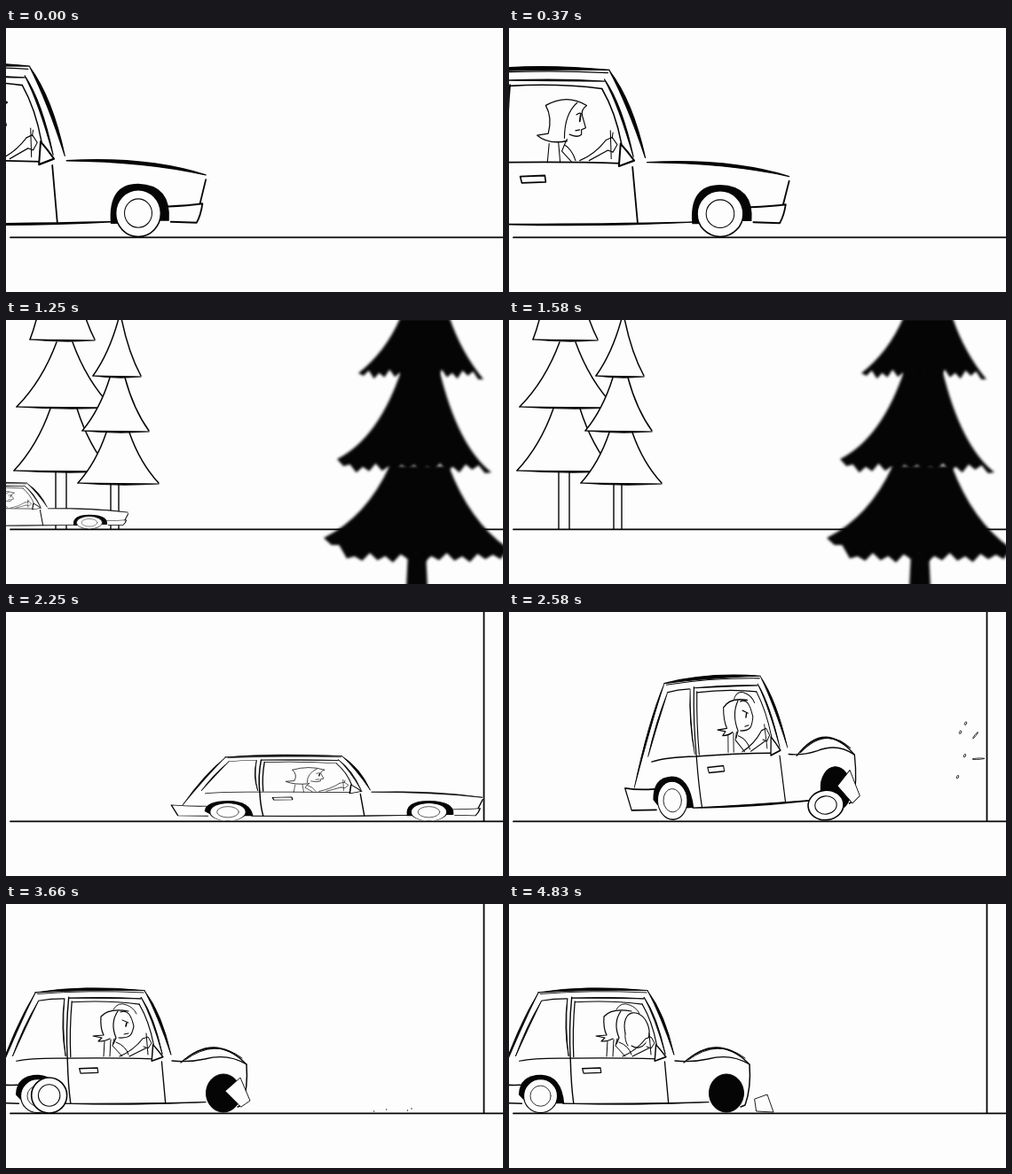
An HTML page with a canvas for the animation above (5000 ms loop, 560 px wide and 298 px high).

```html
<!DOCTYPE html>
<html lang="en">
<head>
<meta charset="utf-8">
<title>Car crash</title>
<style>
html, body { margin: 0; overflow: hidden; background: #fdfdfd; }
canvas { display: block; }
</style>
</head>
<body>
<canvas id="stage" width="560" height="298"></canvas>
<script>
const c = document.getElementById('stage').getContext('2d');
const PAPER = '#fdfdfd', INK = '#050505', GROUND = 236, LOOP = 5000, FPS = 24;
const clamp = v => Math.max(0, Math.min(1, v));

function line(d, w = 1.4) {
  c.lineWidth = w;
  c.stroke(new Path2D(d));
}
function fill(d, color = PAPER) {
  c.fillStyle = color;
  c.fill(new Path2D(d));
}
// Curved stroke that swells to about w in the middle
function brush(x0, y0, cx, cy, x1, y1, w) {
  const len = Math.hypot(x1 - x0, y1 - y0);
  const nx = (y0 - y1) / len * w, ny = (x1 - x0) / len * w;
  const d = `M${x0} ${y0}Q${cx + nx} ${cy + ny} ${x1} ${y1}Q${cx - nx} ${cy - ny} ${x0} ${y0}Z`;
  fill(d, INK);
  line(d, 1.2);
}
function oval(x, y, rx, ry, w, rot = 0, color = PAPER) {
  c.beginPath();
  c.ellipse(x, y, rx, ry, rot, 0, 7);
  c.fillStyle = color;
  c.fill();
  c.lineWidth = w;
  c.stroke();
}
function wheel(x, y, rx, ry, rot = 0) {
  oval(x, y, rx, ry, 1.6, rot);
  oval(x, y, rx * .61, ry * .61, 1.1, rot);
}
// Scale about the ground point under ax, placed at x
function place(ax, x, sx, sy, draw) {
  c.save();
  c.translate(x, GROUND);
  c.scale(sx, sy);
  c.translate(-ax, -GROUND);
  draw();
  c.restore();
}

function cabin() {
  // roof and pillars
  brush(114, 60, 190, 52, 290, 57, 3.6);
  line('M118 62Q200 56 288 60', 1.2);
  brush(114, 61, 84, 110, 50, 192, 2.8);
  brush(119, 73, 96, 112, 78, 153, 2);
  line('M119 72Q138 69 160 69');
  brush(161, 69, 156, 112, 163, 153, 1.2);
  line('M168 67Q163 112 166 160Q167 195 171 222', 2);
  line('M173 73Q169 115 171 154', 1.8);
  brush(169, 68, 230, 67, 284, 69, 1.2);
  line('M173 74Q230 71 281 77', 1.5);
  brush(290, 58, 314, 92, 332, 151, 3.6);
  brush(284, 67, 303, 95, 318, 150, 2);
  line('M281 77Q297 102 304 136', 1.6);
  // belt, door, handle, sill
  line('M84 160Q110 155 165 156Q240 155 304 157', 1.6);
  line('M317 161Q320 190 323 221', 1.9);
  line('M185 171L214 170L215 177L187 178Z', 1.7);
  brush(154, 222, 260, 224, 388, 220, 1.6);
  fill('M303 136Q311 144 319 154L301 160Z');
  line('M303 136Q311 144 319 154L301 160Z', 2.1);
  // rear bumper and wheel
  line('M33 192Q60 196 86 195M33 192L43 221L88 222', 2);
  fill('M83 209Q84 180 119 180Q152 181 156 222L140 222L90 216Z', INK);
  wheel(118, 211, 27, 24.6);
}

function driver() {
  line('M215 95Q240 82 263 95M215 95Q223 108 218 125L205 127Q218 137 240 133', 1.3);
  line('M252 92Q237 104 237 130M263 95Q256 100 258 106L262 119L257 121L257 126Q252 130 243 126', 1.2);
  line('M251 105Q255 102 257 104', 1);
  line('M256 105L255 112', 1.8);
  line('M250 122L255 121M219 136L217 156M230 135L232 156M240 131L237 137Q246 142 250 154M237 137L234 144L245 155', 1.1);
  line('M255 154Q272 148 286 132M266 154L290 142', 1.2);
  fill('M286 132L293 129L299 137L294 145L288 143Z');
  line('M286 132L293 129L299 137L294 145L288 143M291 122L292 152M294 124L293 130', 1.1);
}

function car() {
  fill('M33 192L50 192L114 58Q200 50 290 57L333 155Q430 155 502 171L494 200L490 221L42 222Z');
  driver();
  cabin();
  brush(334, 156, 430, 154, 501, 171, 2.8);
  line('M501 176L494 201', 1.9);
  line('M456 204Q480 203 497 201Q495 213 490 221L459 220', 1.9);
  fill('M387 222Q383 180 420 180Q460 181 457 219L444 219L393 222Z', INK);
  wheel(420, 211, 27, 24.6);
}

function shakenDriver(slump) {
  line('M107 127Q116 117 138 121M107 127Q106 140 110 148L98 149L108 151L104 155Q112 155 117 152', 1.2);
  line('M121 119Q126 110 136 114Q144 117 147 124', .9);
  line('M111 155L110 172M118 153L117 172M122 152L120 160L131 172M124 156Q135 160 138 170', 1);
  const up = [129, 122, 137, 119, 141, 125, 144, 138, 142, 146, 142, 152, 127, 151];
  const down = [131, 146, 125, 117, 150, 116, 157, 138, 162, 152, 150, 168, 138, 160];
  const p = up.map((v, i) => v + (down[i] - v) * slump);
  const head = `M${p[0]} ${p[1]}C${p.slice(2, 8)}C${p.slice(8)}`;
  fill(head);
  line(head, 1.1);
  line('M126 121Q117 134 124 151L121 158', 1.2);
  if (slump < .4) {
    c.save();
    c.translate(slump * 14, slump * 12);
    line('M131 131L138 134M133 147L138 146', 1);
    line('M136 134L135 138', 1.6);
    c.restore();
  } else {
    line('M131 146Q130 154 134 160', 1);
  }
  line('M128 172Q144 165 154 152M139 172L161 161', 1.1);
  fill('M154 152L160 150L164 157L160 163L155 161Z');
  line('M154 152L160 150L164 157L160 163L155 161M158 146L160 170', 1);
}

function wreck(n) {
  const slump = clamp((n - 105) / 11);
  shakenDriver(slump * slump * (3 - 2 * slump));
  place(167, 70, .703, .773, cabin);
  line('M187 177Q206 179 224 175Q250 168 271 181', 1.3);
  brush(197, 179, 235, 145, 270, 180, .8);
  line('M202 176Q236 151 266 174', 1);
  line('M271 181Q273 208 266 227L261 229', 1.5);
  oval(245, 213.5, 19.5, 21.5, 1, 0, INK);
  // fender piece drops off
  const q = clamp((n - 105) / 7);
  const on = [247, 211, 264, 196, 275, 222, 265, 229], off = [277, 220, 291, 215, 298, 235, 279, 234];
  const p = on.map((v, i) => v + (off[i] - v) * (i % 2 ? q * q : q));
  const piece = `M${p}Z`;
  fill(piece);
  line(piece, .9);
}

function crash(n) {
  const d = n - 55, p = clamp(d / 21.6), rest = 1 - p;
  const dx = 267 * rest * rest;
  const tall = 1 + .643 * rest ** 4;
  c.save();
  c.translate(37 + dx, GROUND);
  c.rotate(-.063 * Math.sin(Math.PI * p));
  c.translate(-37, -GROUND);
  place(271, 271, 1 / tall, tall, () => wreck(n));
  c.restore();

  // loose wheel rolls away
  if (n < 96) {
    const u = n - 69;
    const x = u < 0 ? 245 + dx - 20 * d / 14 : 258 - 12.5 * u + .078 * u * u;
    const tilt = u < 0 ? d / 14 : clamp(1 - u / 12);
    wheel(x, 216 + 4 * tilt, 20, 20 - 6.5 * tilt, -.22 * tilt);
    debris(d);
  }
}

function debris(d) {
  const bits = [[499, 101], [487, 121], [497, 174], [481, 222], [521, 128, 1], [528, 181, 1]];
  bits.forEach(([bx, by, shard], i) => {
    const x = 530 + (bx - 530) / 14 * d;
    const y = 190 + ((by - 190) / 14 - 5.66) * d + .4045 * d * d;
    if (y > 233) {
      if (!shard && d > 14) oval(x, 231 + i, .3, .3, .7);
    } else if (shard) {
      oval(x, y, i === 5 ? 7 : 4.5, .7, .8, i === 5 ? -.05 : -.9);
    } else {
      oval(x, y, 1, 2, .8, .4);
    }
  });
}

function tier(topL, topR, top, left, right, base) {
  const my = top + (base - top) * .6;
  const side = (a, b) => `Q${a + (b - a) * .36} ${my} ${b} ${base}`;
  const sides = `M${topL} ${top}${side(topL, left)}`;
  const other = `M${topR} ${top}${side(topR, right)}`;
  fill(`${sides}L${right} ${base}Q${topR + (right - topR) * .36} ${my} ${topR} ${top}Z`);
  line(sides + other, 1.5);
  brush(left, base, (left + right) / 2, base + 2, right, base + 1, 1.6);
}
function trunk(l, r, top) {
  fill(`M${l} ${top}H${r}V236H${l}Z`);
  line(`M${l} ${top}V236M${r} ${top}V236`, 1.4);
}

// Dark tier with a ragged lower edge
function darkTier(topL, topR, top, left, right, leftY, rightY, base) {
  let d = `M${topL} ${top}Q${topL - (topL - left) * .35} ${leftY - 24} ${left} ${leftY}`;
  const count = 24;
  for (let i = 1; i < count; i++) {
    const x = left + (right - left) * i / count;
    const edge = Math.min(base, leftY + i * 6, rightY + (count - i) * 6);
    d += `L${x} ${edge + (i % 2 ? 4 : -3) + 2 * Math.sin(i * 5)}`;
  }
  fill(d + `L${right} ${rightY}Q${topR + (right - topR) * .35} ${rightY - 30} ${topR} ${top}Z`, INK);
}

function forest(n) {
  trunk(56, 68, 172);
  tier(50, 80, 100, 9, 117, 170);
  tier(57, 75, 25, 12, 119, 98);
  tier(42, 80, -40, 27, 100, 22);
  trunk(118, 127, 185);
  tier(113, 139, 127, 81, 172, 184);
  tier(117, 134, 65, 86, 161, 125);
  tier(127, 130, -2, 98, 152, 63);
  ground();
  if (n >= 30 && n < 38) place(420, 94 + 86 * (n - 30), .54, .29, car);
  c.filter = 'blur(1.6px)';
  darkTier(444, 500, -2, 397, 538, 60, 67, 61);
  darkTier(446, 488, 55, 373, 547, 157, 172, 167);
  darkTier(432, 499, 165, 358, 566, 246, 258, 268);
  fill('M453 262L451 302H475L473 262Z', INK);
  c.filter = 'none';
}

function ground() {
  line('M5 236.4H560', 1.8);
}

function draw(n) {
  c.fillStyle = PAPER;
  c.fillRect(0, 0, 560, 298);
  c.strokeStyle = INK;
  c.lineCap = c.lineJoin = 'round';
  if (n < 24) {
    ground();
    const q = (n / 16) ** 2;
    place(420, 149 + 9.1 * n + .0001196 * n ** 5, .94 + .06 * q, 1.078 - .078 * q, car);
  } else if (n < 46) {
    forest(n);
  } else {
    ground();
    line('M538.5 -2V236', 1.8);
    if (n >= 55) crash(n);
    else if (n >= 52) place(502, 538 - 205 * (54 - n), .75, .41, car);
  }
}

const start = performance.now();
function tick() {
  const t = (performance.now() - start) % LOOP;
  draw(Math.floor((t + 8) * FPS / 1000) % (LOOP * FPS / 1000));
  requestAnimationFrame(tick);
}
tick();
</script>
</body>
</html>
```
